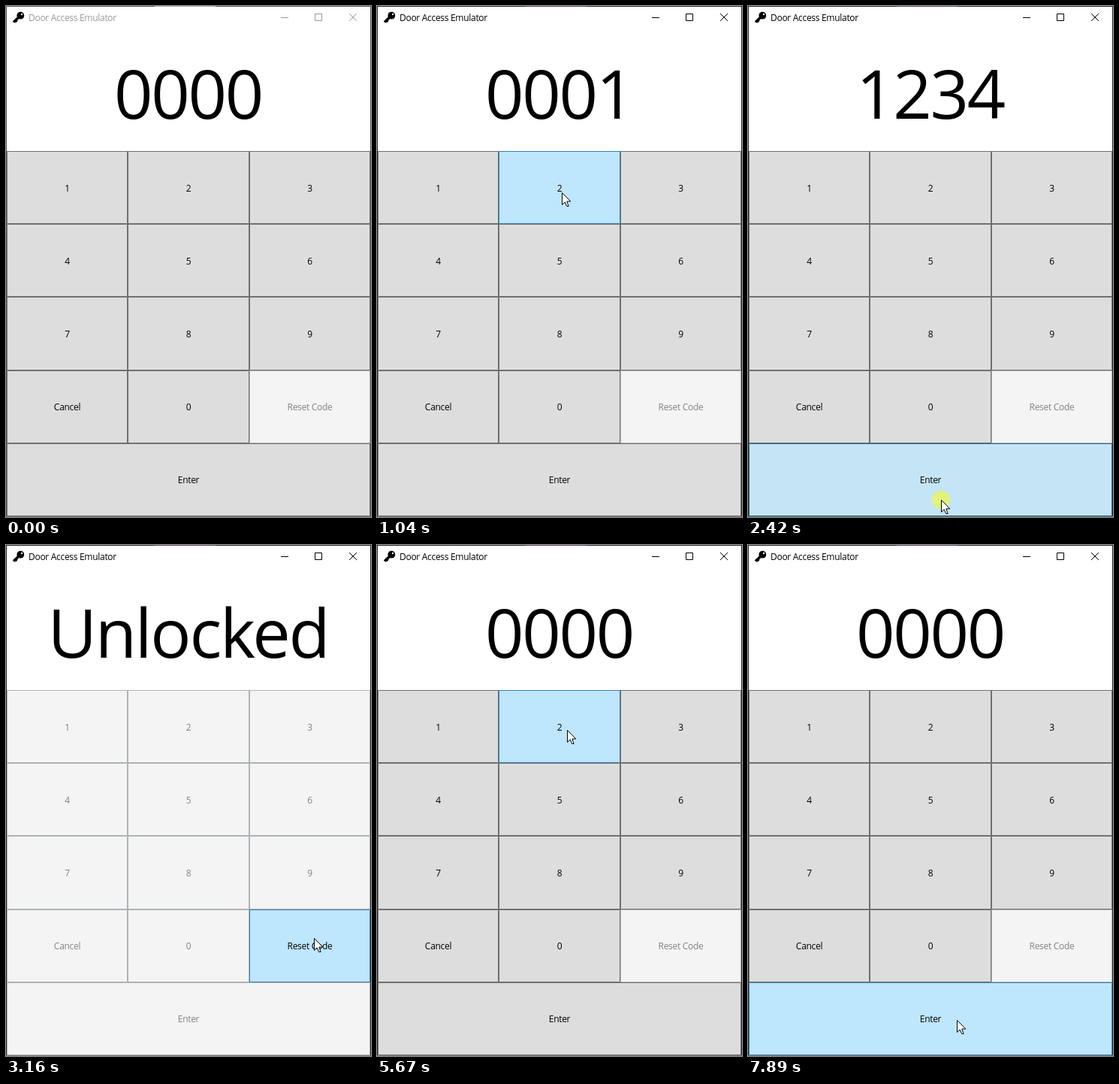
An HTML page with a canvas that plays this animation: 486 px wide and 680 px high, repeating every 8000 ms.

```html
<!DOCTYPE html>
<html lang="en">
<head>
<meta charset="utf-8">
<title>Door Access Emulator</title>
<style>
  html, body { margin: 0; width: 100%; height: 100%; overflow: hidden; background: #fff; }
  canvas { display: block; }
</style>
</head>
<body>
<canvas id="stage" width="486" height="680"></canvas>
<script>
const ctx = document.getElementById('stage').getContext('2d');
const LOOP = 8000;
const HOLD = 100;          // how long the mouse button stays down
const PROMPT_TIME = 1620;  // how long the prompt blocks the keypad
const PROMPT = 'Enter your new pin and press enter';
const GRANTED = 'Unlocked';

const colX = col => Math.round(1 + col * 484 / 3);
const rowY = row => Math.round(193 + row * 97.2);

function makeButton(label, row, col, span = 1) {
  const x = colX(col), y = rowY(row);
  return { label, x, y, w: colX(col + span) - x, h: rowY(row + 1) - y, baseline: 247 + 97 * row };
}

const buttons = [1, 2, 3, 4, 5, 6, 7, 8, 9, 'Cancel', 0, 'Reset Code']
  .map((label, i) => makeButton(String(label), Math.floor(i / 3), i % 3));
buttons.push(makeButton('Enter', 4, 0, 3));

const contains = (b, x, y) => x >= b.x && x < b.x + b.w && y >= b.y && y < b.y + b.h;

// fill, border, text
const looks = {
  normal: ['#dddddd', '#707070', '#000'],
  hover: ['#bee6fd', '#3c7fb1', '#000'],
  pressed: ['#c4e5f6', '#2c628b', '#000'],
  disabled: ['#f4f4f4', '#adb2b5', '#838383'],
};

// The cursor travels from stop to stop and may click there; a press counts on release.
const stops = [{ arrive: 170, x: 440, y: 690 }];
const presses = [];

function visit(depart, arrive, x, y, ...releases) {
  stops.push({ depart, arrive, x, y });
  const key = buttons.find(b => contains(b, x, y)).label;
  for (const at of releases) presses.push({ at, key });
}

for (let i = 0; i < 4; i++) {
  const release = 870 + 360 * i, { x, y } = buttons[i];
  visit(i ? release - 340 : 170, release - 190, x + 84, y + 55, release);
}
visit(1970, 2340, 257, 657, 2470);
visit(2700, 3160, 410, 523, 3670);
visit(4080, 4460, 257, 288);
visit(5290, 5670, 253, 246, 6130, 6410, 6690, 6970);
visit(7060, 7180, 273, 425);
visit(7230, 7430, 278, 632, 7600);

function cursorAt(t) {
  const i = stops.findIndex(s => s.arrive > t);
  if (i < 0) return stops[stops.length - 1];
  const from = stops[i - 1], to = stops[i];
  const u = Math.max(0, (t - to.depart) / (to.arrive - to.depart));
  const k = u * u * (3 - 2 * u);
  return {
    x: Math.round(from.x + (to.x - from.x) * k),
    y: Math.round(from.y + (to.y - from.y) * k),
  };
}

// Replays all presses up to time t and returns the text on the display.
function displayAt(t) {
  let code = '0000', shown = code, resetting = false;
  for (const { at, key } of presses) {
    if (at > t) break;
    if (key === 'Reset Code') {
      resetting = true;
      code = '0000';
      shown = t < at + PROMPT_TIME ? PROMPT : code;
    } else if (key === 'Enter') {
      code = '0000';
      shown = resetting ? code : GRANTED;
    } else {
      shown = code = code.slice(1) + key;
    }
  }
  return shown;
}

function rect(color, x, y, w, h) {
  ctx.fillStyle = color;
  ctx.fillRect(x, y, w, h);
}

function outline(color, x, y, w, h) {
  ctx.strokeStyle = color;
  ctx.lineWidth = 1;
  ctx.strokeRect(x + 0.5, y + 0.5, w - 1, h - 1);
}

function line(path, color, width = 1) {
  ctx.strokeStyle = color;
  ctx.lineWidth = width;
  ctx.stroke(new Path2D(path));
}

function disc(color, x, y, r) {
  ctx.fillStyle = color;
  ctx.beginPath();
  ctx.arc(x, y, r, 0, 7);
  ctx.fill();
}

function text(str, x, baseline, size, color, align = 'center') {
  ctx.font = `${size}px "Open Sans", "Noto Sans", sans-serif`;
  ctx.letterSpacing = `${-0.025 * size}px`;
  ctx.textAlign = align;
  ctx.fillStyle = color;
  ctx.fillText(str, x, baseline);
}

function drawWindow(active) {
  const ink = active ? '#000' : '#999';
  rect('#fff', 0, 0, 486, 680);
  outline(active ? '#2b2b2e' : '#5a5a5c', 0, 0, 486, 680);
  rect(active ? '#5b4a63' : '#aaa5ad', 198, 0, 81, 1);
  rect('#7a7a7a', 0, 679, 486, 1);

  line('M18 14L10 21.5M12 19l2.5 2', '#000', 3.5);
  disc('#000', 19.3, 12.7, 4.9);
  disc('#fff', 21, 11, 1.2);

  text('Door Access Emulator', 30, 20, 12, ink, 'left');
  line('M366 15.5h10M411.5 10.5h9v9h-9zM457 10l10 10M467 10l-10 10', ink);
}

function drawButton(b, state) {
  const [fill, border, ink] = looks[state];
  rect(fill, b.x, b.y, b.w, b.h);
  outline(border, b.x, b.y, b.w, b.h);
  text(b.label, b.x + b.w / 2, b.baseline, 12, ink);
}

function drawCursor({ x, y }, down) {
  if (down) disc('rgba(255,255,0,.5)', x, y, 12);
  const arrow = 'M0 0V16L3.7 12.5L6.2 18H8.6L6.3 11.5H11.3Z';
  ctx.save();
  ctx.translate(x + 0.5, y + 0.5);
  ctx.fillStyle = '#fff';
  ctx.fill(new Path2D(arrow));
  line(arrow, '#000');
  ctx.restore();
}

function draw(t) {
  const shown = displayAt(t);
  const down = presses.some(p => t >= p.at - HOLD && t < p.at);
  const cursor = cursorAt(Math.max(t, stops[0].arrive));

  drawWindow(t >= presses[0].at - HOLD);
  if (shown === PROMPT) text(shown, 242.5, 124, 28.5, '#000');
  else text(shown, 242.5, 150, 90, '#000');

  for (const b of buttons) {
    const enabled = b.label === 'Reset Code' ? shown === GRANTED : shown.length === 4;
    const over = contains(b, cursor.x, cursor.y);
    drawButton(b, !enabled ? 'disabled' : !over ? 'normal' : down ? 'pressed' : 'hover');
  }
  drawCursor(cursor, down);
}

function frame() {
  draw(performance.now() % LOOP);
  requestAnimationFrame(frame);
}
frame();
</script>
</body>
</html>
```
